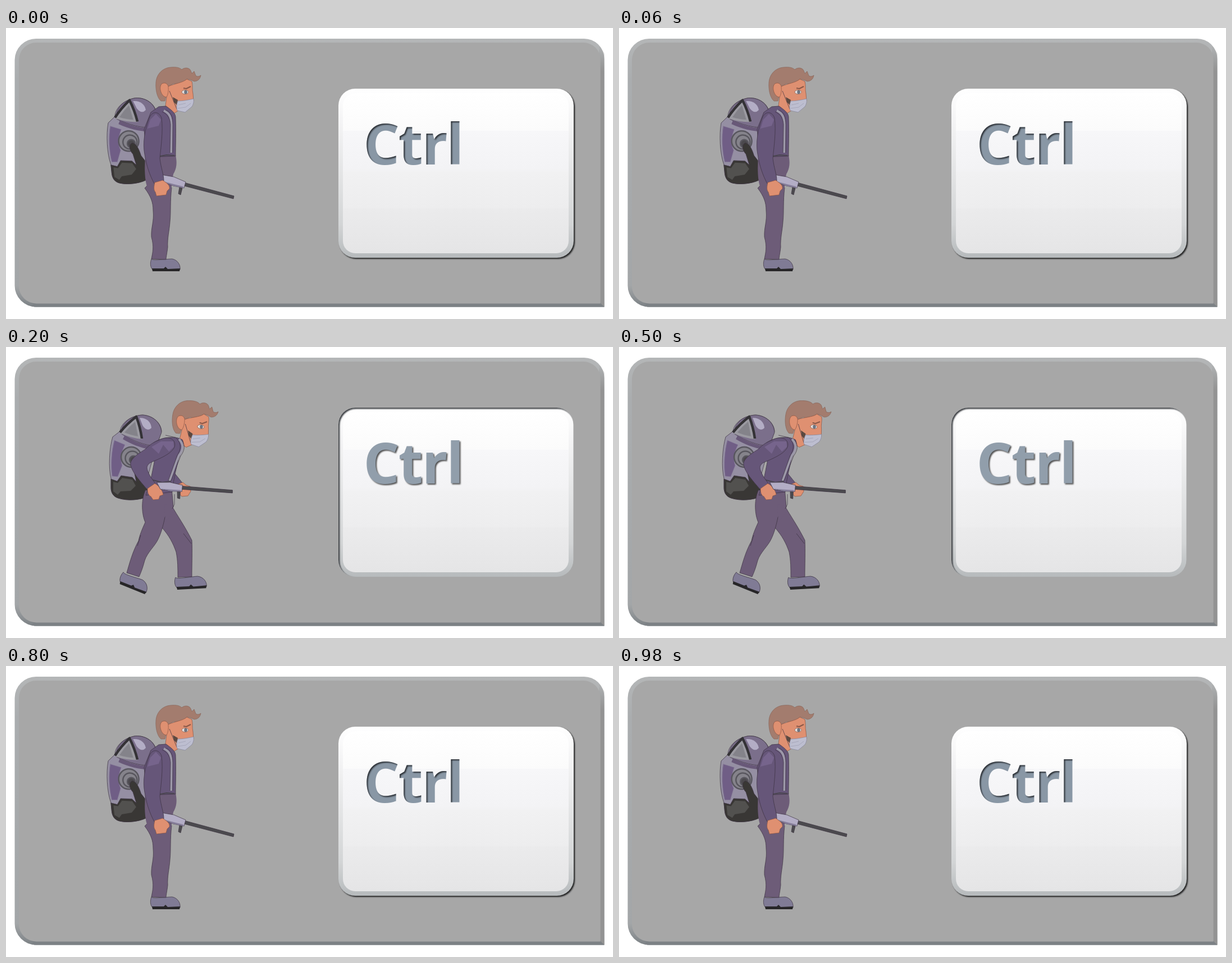
These frames come from a looping animation (1081x518 px, 1100 ms). An HTML page:

```html
<!DOCTYPE html>
<html lang="en">
<head>
<meta charset="utf-8">
<title>Ctrl to crouch</title>
<style>
html, body { margin: 0; width: 100%; height: 100%; overflow: hidden; background: #fff; }
svg { display: block; width: 100%; height: 100%; }
text { font: 700 101px "Open Sans", "Noto Sans", sans-serif; letter-spacing: -2px; }

/* Every pose is a hard cut in one shared 1.1 s loop. */
.up, .mid, .low, .down { animation: up 1100ms step-end infinite; }
.mid { animation-name: mid; }
.low { animation-name: low; }
.down { animation-name: down; }
@keyframes up { 0% { visibility: visible } 9.0909% { visibility: hidden } 72.727% { visibility: visible } }
@keyframes down { 0% { visibility: hidden } 9.0909% { visibility: visible } 72.727% { visibility: hidden } }
@keyframes mid {
  0% { visibility: hidden } 9.0909% { visibility: visible } 18.1818% { visibility: hidden }
  63.6363% { visibility: visible } 72.727% { visibility: hidden }
}
@keyframes low { 0% { visibility: hidden } 18.1818% { visibility: visible } 63.6363% { visibility: hidden } }

.fig { stroke: #3b3240; stroke-width: .7; stroke-linejoin: round; }
.suit { fill: #6d5c78; }
.coat { fill: #665679; }
.glow { fill: #76648c; stroke: none; }
.skin { fill: #df9071; stroke: #8c5544; }
.hair { fill: #a37c6e; stroke: #87655a; }
.mask { fill: #bdbed0; stroke: #84849a; }
.lilac { fill: #b3adc5; }
.black { fill: #393735; }
.iron { fill: #4b4a4e; }
.shoe { fill: #807b95; }
.line { fill: none; }
.strap { fill: none; stroke: #9c98a8; stroke-width: 4; }
.belt { fill: none; stroke: #4a4550; stroke-width: 2; }
</style>
</head>
<body>
<svg viewBox="0 0 1081 518" preserveAspectRatio="none">
<defs>
  <linearGradient id="bevel" x2="0" y2="1">
    <stop stop-color="#b4b6b7"/><stop offset=".15" stop-color="#aaadaf"/>
    <stop offset=".92" stop-color="#a3a6a8"/><stop offset="1" stop-color="#7c8185"/>
  </linearGradient>
  <linearGradient id="side" x2="0" y2="1">
    <stop stop-color="#939393" stop-opacity="0"/><stop offset=".1" stop-color="#939393"/>
  </linearGradient>
  <linearGradient id="rim" x2="0" y2="1">
    <stop stop-color="#fff"/><stop offset=".2" stop-color="#f4f4f5"/>
    <stop offset=".8" stop-color="#d3d5d6"/><stop offset="1" stop-color="#b6babc"/>
  </linearGradient>
  <linearGradient id="face" x2="0" y2="1">
    <stop stop-color="#fff"/><stop offset=".235" stop-color="#fbfbfb"/>
    <stop offset=".235" stop-color="#f7f7f9"/><stop offset=".47" stop-color="#f3f3f5"/>
    <stop offset=".5" stop-color="#f1f1f2"/><stop offset=".72" stop-color="#ededee"/>
    <stop offset=".72" stop-color="#ebebec"/><stop offset="1" stop-color="#e5e5e6"/>
  </linearGradient>
  <filter id="soft"><feGaussianBlur stdDeviation=".8"/></filter>
  <filter id="cut" color-interpolation-filters="sRGB">
    <feOffset in="SourceAlpha" dx="2.2" dy="2.2"/>
    <feGaussianBlur stdDeviation="1.3" result="hole"/>
    <feFlood flood-color="#25282c" flood-opacity=".9"/>
    <feComposite operator="out" in2="hole"/>
    <feComposite operator="in" in2="SourceAlpha" result="edge"/>
    <feMerge><feMergeNode in="SourceGraphic"/><feMergeNode in="edge"/></feMerge>
  </filter>
  <filter id="lift" color-interpolation-filters="sRGB">
    <feDropShadow dx="2" dy="2" stdDeviation="1" flood-color="#333" flood-opacity=".85"/>
  </filter>

  <g id="head">
    <path class="hair" d="M276 130C269 124 266 110 267 97C268 82 279 71 293 70C302 69 309 70 313 74C319 69 327 71 329 76L331 81L335 77L338 85C341 87 345 86 347 84C346 91 341 95 335 95C331 93 327 91 322 91C316 97 306 100 298 99L289 104L283 130Z"/>
    <path class="skin" d="M289 104C300 99 316 97 322 91L331 95C333 103 331 109 333 117L334 130L304 149L297 153L283 146L286 123C276 123 271 104 278 99C284 96 288 100 289 104Z"/>
    <path class="line" stroke="#8c5544" d="M289 104Q290 116 286 123"/>
    <path class="black" stroke="none" fill-opacity=".8" d="M297 123L306 128L304 137L299 132Z"/>
    <path class="line" d="M291 112L304 144"/>
    <path class="mask" d="M306 130C315 130 325 128 334 126C335 132 333 137 331 140L319 150L305 147C303 142 304 135 306 130Z"/>
    <path class="line" stroke="#9c9cb0" d="M307 137L320 134M306 143L320 141L329 134"/>
    <path class="line" stroke="#8a5848" stroke-width="2.2" d="M316 107L321 108L329 104"/>
    <ellipse cx="319" cy="114" rx="6" ry="3.6" fill="#e5dfdd" stroke="#7d5549"/>
    <ellipse cx="320" cy="114" rx="2.8" ry="3.2" fill="#6d7480" stroke="none"/>
  </g>

  <g id="shoe">
    <path class="shoe" d="M-2-21C1-17 24-21 35-21C45-19 50-10 49-2L0-2C-5-7-4-16-2-21Z"/>
    <path fill="#272628" stroke="none" d="M-1-4H20L23-7L27-3L49-4L48 1L0 1Z"/>
  </g>

  <g id="gun">
    <path class="iron" d="M309 283L314 285L311 297L307 295Z"/>
    <path class="iron" d="M317 275L406 299L405 304L317 281Z"/>
    <path class="lilac" d="M276 261L299 265L320 274L317 285L298 281L280 274Z"/>
    <path fill="#857d99" stroke="none" d="M280 273L299 278L315 282L317 285L298 281Z"/>
  </g>

  <g id="pack">
    <path fill="#958fa3" d="M203 150C205 135 222 122 243 121C262 122 276 135 277 150L262 195L250 240L250 265C240 273 215 274 200 269C190 266 187 258 187 250L187 234C182 215 184 180 190 160Z"/>
    <path fill="#7b6f8b" d="M206 147C210 131 226 122 243 121C262 122 276 135 277 152L268 176C248 176 226 167 206 155Z"/>
    <path class="lilac" stroke="none" d="M238 126C249 126 258 132 259 144C253 150 247 146 243 139Z"/>
    <path fill="#685878" stroke="none" d="M211 158C227 168 247 176 267 177L265 184C245 181 226 175 208 164Z"/>
    <path fill="#9b9aa1" stroke="none" d="M202 153Q215 137 232 123Q239 142 242 164Q222 162 202 153Z"/>
    <path fill="#84838a" stroke="none" d="M211 152Q220 141 230 133L235 159Q222 157 211 152Z"/>
    <path fill="none" stroke="#343236" stroke-width="4.5" d="M203 152Q215 137 232 124Q239 142 242 163"/>
    <path fill="#705e86" stroke="#8b829c" d="M193 166L212 174C205 188 203 198 207 211L199 231L189 230C186 209 188 184 193 166Z"/>
    <g fill="#85838b" stroke="#58565e" stroke-width="2.5">
      <circle cx="223" cy="196" r="18"/><circle cx="225" cy="198" r="12.5"/>
      <circle cx="227" cy="201" r="7" fill="#4b494d"/>
    </g>
    <path class="black" d="M187 235L198 239L205 229L225 232L232 240L228 220C222 212 222 202 229 200C237 203 240 214 242 224L252 240V266C240 273 215 274 200 269C190 266 187 258 187 250Z"/>
    <path fill="#52514f" stroke="none" d="M191 240L199 242L207 233L225 236L231 247L222 256L204 257L199 263L191 257Z"/>
  </g>
</defs>

<!-- panel -->
<path fill="url(#bevel)" d="M54 19H1029A36 36 0 0 1 1065.5 55V496.5H54A38 38 0 0 1 15.5 458V57A38 38 0 0 1 54 19Z"/>
<path fill="url(#side)" d="M1056 30L1065.5 45V496.5L1056 489Z"/>
<path fill="#7c8185" d="M50 496.5H1065.5L1058 489H46Z"/>
<path fill="#a7a7a7" d="M54 26H1028A30 30 0 0 1 1058.5 56V490.5H54A31 31 0 0 1 23 459V57A31 31 0 0 1 54 26Z"/>

<!-- key -->
<g class="up">
  <rect x="594" y="110" width="419" height="301" rx="30" fill="#202124" filter="url(#soft)"/>
  <rect x="592" y="108" width="419" height="301" rx="30" fill="url(#rim)"/>
</g>
<rect class="down" x="592" y="108" width="418.5" height="301" rx="30" fill="url(#rim)" filter="url(#cut)"/>
<rect x="600" y="116" width="402" height="285" rx="22" fill="url(#face)"/>
<text class="up" x="636.5" y="243" fill="#8997a5" filter="url(#cut)">Ctrl</text>
<text class="down" x="636.5" y="243" fill="#919eab" filter="url(#lift)">Ctrl</text>

<!-- standing -->
<g class="fig up">
  <use href="#pack" transform="translate(-4 5) rotate(-6 225 200)"/>
  <use href="#shoe" transform="translate(261 432)"/>
  <path class="suit" d="M252 280L295 284C292 310 294 325 292 345C291 360 287 375 288 390C287 400 285 408 285 412L259 411C261 400 264 390 259 372C258 355 264 345 262 325C262 310 258 300 247 285Z"/>
  <path class="suit" stroke="none" d="M248 230L302 226C305 240 304 250 298 260C296 272 295 280 294 292L258 294C247 284 246 255 248 230Z"/>
  <use href="#head"/>
  <path class="coat" d="M258 150L272 140L285 139C293 145 301 150 302 158C303 185 302 210 302 228L250 230L246 180Z"/>
  <path class="strap" d="M281 147C292 152 294 160 295 172L294 222"/>
  <path class="line" d="M278 149C289 154 292 162 293 172L292 222M284 146C295 150 297 160 297 172V222"/>
  <path class="belt" d="M270 229L286 226L300 227"/>
  <use href="#gun"/>
  <path class="coat" d="M256 158C262 147 273 149 277 160C280 185 276 210 274 232C276 250 281 260 281 272L264 277C256 262 250 245 247 225C243 205 247 180 256 158Z"/>
  <path class="glow" d="M257 163L267 153L276 163L272 174L252 179Z"/>
  <path class="skin" d="M265 275L279 271C286 276 292 279 291 286L287 290L285 297L268 299L266 292C262 288 264 280 265 275Z"/>
</g>

<!-- stepping -->
<g class="fig mid">
  <use href="#pack"/>
  <use href="#shoe" transform="translate(275 412) rotate(15)"/>
  <use href="#shoe" transform="translate(222 420) rotate(17)"/>
  <path class="suit" d="M270 280L298 280C299 300 310 315 328 339C330 343 330 350 327 353C318 365 314 385 311 401L286 395C293 385 296 372 303 353C298 344 290 335 283 322Z"/>
  <path class="suit" d="M248 262L298 262L299 285L286 301C286 317 281 333 276 346C272 357 266 367 266 382C259 393 256 400 253 408L230 403C234 390 235 378 241 362C239 345 249 325 250 308C246 295 246 278 248 262Z"/>
  <path class="suit" stroke="none" d="M284 280L298 282L300 300L287 314Z"/>
  <path class="coat" d="M296 230C303 245 310 255 315 265L301 271L290 250Z"/>
  <path class="skin" d="M301 268L314 264L319 272L324 274L323 283L315 285L314 292L304 292L299 283Z"/>
  <use href="#head" transform="translate(7.5 9.3) rotate(1 300 110)"/>
  <path class="coat" d="M262 160L278 149L292 151C301 155 308 160 310 170C311 180 305 195 303 210C301 225 297 235 300 262L250 267L258 235Z"/>
  <path class="strap" d="M288 153C300 158 304 165 303 176C299 194 296 210 293 228"/>
  <path class="line" d="M284 154C297 160 302 168 301 176L291 228M290 151C302 156 307 165 305 176L295 228"/>
  <path class="belt" d="M258 232L275 234L296 231"/>
  <path class="coat" d="M283 152C295 160 290 178 278 185C268 198 260 206 256 216C258 230 264 240 268 260L249 266C243 255 232 238 229 222C227 205 240 192 248 178C255 165 268 153 283 152Z"/>
  <path class="glow" d="M262 168L280 155L288 164L283 178L270 183L266 176Z"/>
  <path class="skin" d="M249 265L264 261C272 264 274 272 273 279L269 281L268 287L253 289L253 282C246 279 246 271 249 265Z"/>
  <use href="#gun" transform="translate(-11.5 .5) rotate(3 319 278)"/>
</g>

<!-- crouching -->
<g class="fig low">
  <use href="#pack"/>
  <use href="#shoe" transform="translate(305 431) rotate(-3) scale(1.07 1)"/>
  <use href="#shoe" transform="translate(203 421) rotate(22)"/>
  <path class="suit" d="M272 285L296 284C305 300 318 318 331 344C332 360 331 390 331 409L306 410C306 395 306 380 303 365C298 350 290 335 278 322Z"/>
  <path class="suit" d="M248 255L295 250L298 285L283 303C280 318 276 332 271 342C265 355 252 365 247 380C243 395 240 402 237 409L215 402C220 385 225 365 236 345C238 335 242 325 248 312C242 298 240 275 248 255Z"/>
  <path class="suit" stroke="none" d="M282 280L297 283L299 292L284 312Z"/>
  <path class="line" d="M300 262V280L296 288M240 335L234 354M316 332L330 350"/>
  <path class="coat" d="M298 222L315 243L305 250L292 240Z"/>
  <path class="skin" d="M307 244L315 241L321 246L328 248L329 257L324 265L313 266L306 258Z"/>
  <use href="#head" transform="translate(28.5 26) rotate(6 300 110)"/>
  <path class="coat" d="M262 171C275 161 300 157 314 165C320 176 311 190 307 200C304 215 299 230 296 258L249 264L258 235L264 205Z"/>
  <path class="strap" d="M308 164C318 174 315 184 308 193C301 208 297 223 291 238"/>
  <path class="line" d="M284 157L302 161C314 172 311 183 305 193L289 238M312 165C321 175 317 186 311 194L294 238"/>
  <path class="belt" d="M258 236L278 241L294 239"/>
  <path class="coat" d="M272 166C290 156 304 165 300 178C295 190 275 198 257 206C248 212 250 218 258 232L266 243L251 253C238 238 224 222 222 210C220 200 235 190 248 182C258 172 264 169 272 166Z"/>
  <path class="glow" d="M259 178L276 168L298 168L299 178L290 186L280 174L272 190Z"/>
  <path class="skin" d="M252 252L265 243C273 247 279 256 280 263L274 265L272 271L262 272L258 266C253 264 252 258 252 252Z"/>
  <use href="#gun" transform="translate(-5 -28) rotate(-10.5 319 278)"/>
</g>
</svg>
</body>
</html>
```
